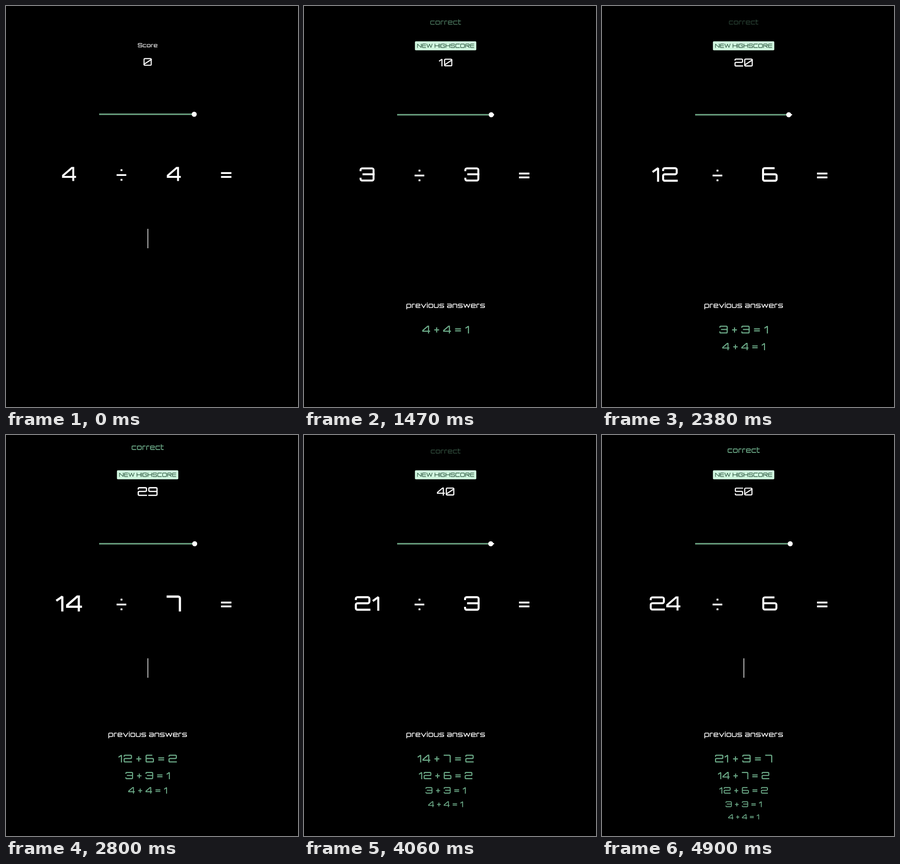
An HTML page with a canvas for the animation above (4.97 s loop, 602 by 826 pixels).

```html
<!DOCTYPE html>
<html lang="en">
<head>
<meta charset="utf-8">
<title>Arithmetic game</title>
<style>
  html, body { margin: 0; width: 100%; height: 100%; overflow: hidden; background: #000; }
  canvas { display: block; }
</style>
</head>
<body>
<canvas id="stage" width="602" height="826"></canvas>
<script>
const canvas = document.getElementById('stage');
const ctx = canvas.getContext('2d');

const LOOP = 4970, TICK = 70, CX = 292;
const WHITE = '#fff', GREEN = '#6dac89', TRACK = '#69ab84';

// Stroke font on a named grid, in hundredths of an em.
// Each point is a column letter followed by a row letter; z closes a stroke.
const STEM = 10;
const ROWS = { a: -67, g: -66, u: -58, x: -51, e: -42, h: -37, p: -33, m: -28, f: -24, k: -21, j: -14, b: -5, d: 13 };
const SHARP = '14NWvw';
const GLYPHS = {
  0: [77, 'la ra rb lb z|lj ru'],
  1: [33, 'lx ra rb', 6, 10],
  2: [77, 'lu la ra rh lh lb rb'],
  3: [77, 'lu la ra rb lb lj|ih rh'],
  4: [72, 'rk lk lm ta sa sb', 2, 3],
  5: [77, 'ra la lh rh rb lb lj'],
  6: [77, 'oa la lb rb rh lh'],
  7: [65, 'la ra rb'],
  8: [77, 'la ra rb lb z|lh rh'],
  9: [77, 'rh lh la ra rb lb'],
  '+': [45, 'lp rp|cx cj'],
  '=': [54, 'le re|lf rf'],
  ' ': [0, '', 15, 15],
  N: [76, 'lb la rb ra'],
  E: [70, 'ra la lb rb|lh rh'],
  W: [104, 'la ib ca ob ra'],
  H: [77, 'la lb|ra rb|lh rh'],
  I: [10, 'la lb'],
  G: [77, 'ru ra la lb rb rh ch'],
  S: [77, 'ru ra la lh rh rb lb lj'],
  C: [75, 'ra la lb rb'],
  O: [78, 'la ra rb lb z'],
  R: [76, 'lb la ra rh lh|ch rb'],
  a: [62, 'lx rx rb lb lm rm'],
  c: [60, 'rx lx lb rb'],
  e: [62, 'rb lb lx rx rm lm'],
  i: [10, 'lx lb|la lg'],
  n: [62, 'lb lx rx rb'],
  o: [62, 'lx rx rb lb z'],
  p: [62, 'ld lx rx rb lb'],
  r: [40, 'lb lx rx'],
  s: [62, 'rx lx lm rm rb lb'],
  t: [36, 'la lb rb|lx rx'],
  u: [62, 'lx lb rb rx'],
  v: [68, 'lx cb rx'],
  w: [90, 'lx ib cx ob rx']
};

// Questions with the moment each one appears.
const QUESTIONS = [
  { at: -400, a: 4, b: 4 },
  { at: 915, a: 3, b: 3 },
  { at: 1670, a: 12, b: 6 },
  { at: 2510, a: 14, b: 7 },
  { at: 3390, a: 21, b: 3 },
  { at: 4500, a: 24, b: 6 }
];

// Keyframes: [ms since the question appeared, value]
const PULSE = [[0, 1], [70, 1.08], [200, 1.17], [290, 1.14], [400, 1.01], [560, 1], [690, 1.05], [850, 1]];
const PRAISE_Y = [[135, 2], [200, 13], [290, 25], [400, 31], [550, 33]];
const PRAISE_SIZE = [[400, 15.7], [680, 14.5], [850, 14]];
const PRAISE_ALPHA = [[135, 0], [230, 0.9], [280, 1], [400, 1], [670, 0.42], [850, 0.1], [890, 0]];

function track(keys, t) {
  const i = keys.findIndex(k => k[0] > t);
  if (i < 0) return keys[keys.length - 1][1];
  if (i === 0) return keys[0][1];
  const [t0, v0] = keys[i - 1], [t1, v1] = keys[i];
  return v0 + (v1 - v0) * (t - t0) / (t1 - t0);
}

function columns(w) {
  return { l: STEM / 2, r: w - STEM / 2, c: w / 2, i: w * 0.26, o: w * 0.74, s: w * 0.8, t: w * 0.7 };
}

function drawStroke(spec, w, sharp) {
  const cols = columns(w);
  const names = spec.split(' ');
  const closed = names[names.length - 1] === 'z';
  if (closed) names.pop();
  const pts = names.map(n => [cols[n[0]], ROWS[n[1]]]);
  const radius = sharp ? 0 : 8;
  const last = pts.length - 1;
  ctx.beginPath();
  if (closed) {
    ctx.moveTo((pts[0][0] + pts[1][0]) / 2, (pts[0][1] + pts[1][1]) / 2);
    for (let i = 1; i <= pts.length; i++) {
      ctx.arcTo(...pts[i % pts.length], ...pts[(i + 1) % pts.length], radius);
    }
    ctx.closePath();
  } else {
    ctx.moveTo(...pts[0]);
    for (let i = 1; i < last; i++) ctx.arcTo(...pts[i], ...pts[i + 1], radius);
    ctx.lineTo(...pts[last]);
  }
  ctx.stroke();
}

// Centres the ink of a line on x and its capitals on y.
function drawText(str, x, y, size, color) {
  const list = [...String(str)].map(ch => {
    const [w, path, left = 5, right = 5] = GLYPHS[ch];
    return { ch, w, path, left, right };
  });
  const full = list.reduce((sum, g) => sum + g.left + g.w + g.right, 0);
  const ink = full - list[0].left - list[list.length - 1].right;
  ctx.save();
  ctx.translate(x, y + 0.36 * size);
  ctx.scale(size / 100, size / 100);
  ctx.translate(-ink / 2 - list[0].left, 0);
  ctx.strokeStyle = color;
  ctx.lineWidth = STEM;
  ctx.lineCap = 'square';
  ctx.lineJoin = 'miter';
  ctx.miterLimit = 2;
  for (const g of list) {
    ctx.translate(g.left, 0);
    if (g.path) g.path.split('|').forEach(s => drawStroke(s, g.w, SHARP.includes(g.ch)));
    ctx.translate(g.w + g.right, 0);
  }
  ctx.restore();
}

function box(x, y, w, h, color) {
  ctx.fillStyle = color;
  ctx.fillRect(x, y, w, h);
}

function drawHeader(index, age, pulse, shift) {
  if (index === 0) {
    drawText('Score', CX, 80.8, 11.8, WHITE);
  } else {
    ctx.fillStyle = '#d0f7df';
    ctx.beginPath();
    ctx.roundRect(228.7, 72.7, 126.5, 18.5, 2);
    ctx.fill();
    drawText('NEW HIGHSCORE', CX, 82, 11.65, '#2c5540');
  }
  const gained = Math.round(10 * (1 - Math.exp(-age / 100)));
  const score = index ? (index - 1) * 10 + gained : 0;
  drawText(score, CX, 115.2 + shift * 1.2, 22 * pulse, WHITE);
}

function drawTimer(age, shift) {
  const y = 223 + shift;
  const x = 392 - Math.round(age / 100);
  box(192, y - 1.2, 200, 2.4, WHITE);
  box(192, y - 1.2, x - 192, 2.4, TRACK);
  ctx.fillStyle = WHITE;
  ctx.beginPath();
  ctx.arc(x, y, 5.2, 0, Math.PI * 2);
  ctx.fill();
}

function drawQuestion(q, pulse, shift) {
  const y = 346 + shift;
  drawText(q.a, 130, y, 40 * pulse, WHITE);
  drawText(q.b, 346, y, 40 * pulse, WHITE);
  box(228, y + 0.4, 20, 3.6, WHITE);
  box(236.2, y - 9.8, 3.8, 3.8, WHITE);
  box(236.2, y + 10.2, 3.8, 3.8, WHITE);
  box(443.3, y - 3.8, 21.4, 3.8, WHITE);
  box(443.3, y + 4.2, 21.4, 3.8, WHITE);
}

function drawHistory(index) {
  if (index === 0) return;
  drawText('previous answers', CX, 616.4, 15.6, WHITE);
  const rows = [666.5, 701.5, 732, 760.5, 786.5];
  for (let i = 0; i < index; i++) {
    const { a, b } = QUESTIONS[index - 1 - i];
    drawText(`${a} + ${b} = ${a / b}`, CX, rows[i], 22.4 - 1.9 * i, GREEN);
  }
}

function drawPraise(age) {
  ctx.globalAlpha = track(PRAISE_ALPHA, age);
  if (ctx.globalAlpha > 0) {
    drawText('correct', CX, track(PRAISE_Y, age), track(PRAISE_SIZE, age), GREEN);
  }
  ctx.globalAlpha = 1;
}

let shown = -1;
function describe(index) {
  if (index === shown) return;
  shown = index;
  const { a, b } = QUESTIONS[index];
  canvas.textContent = `Score ${index * 10}. ${a} ÷ ${b} =`;
}

function render(t) {
  const index = QUESTIONS.filter(q => q.at <= t).length - 1;
  const q = QUESTIONS[index];
  const age = t - q.at;
  const shift = index ? 1 : 0;
  const pulse = index ? track(PULSE, age) : 1;

  box(0, 0, 602, 826, '#000');
  if (index) drawPraise(age);
  drawHeader(index, age, pulse, shift);
  drawTimer(age, shift);
  drawQuestion(q, pulse, shift);
  const blink = index ? age : t + 150;
  if (blink % 1000 < 500) box(291.8, 459 + shift, 1.4, 40, WHITE);
  drawHistory(index);
  describe(index);
}

function frame() {
  const t = performance.now() % LOOP;
  render(Math.floor(t / TICK) * TICK);
  requestAnimationFrame(frame);
}
frame();
</script>
</body>
</html>
```
